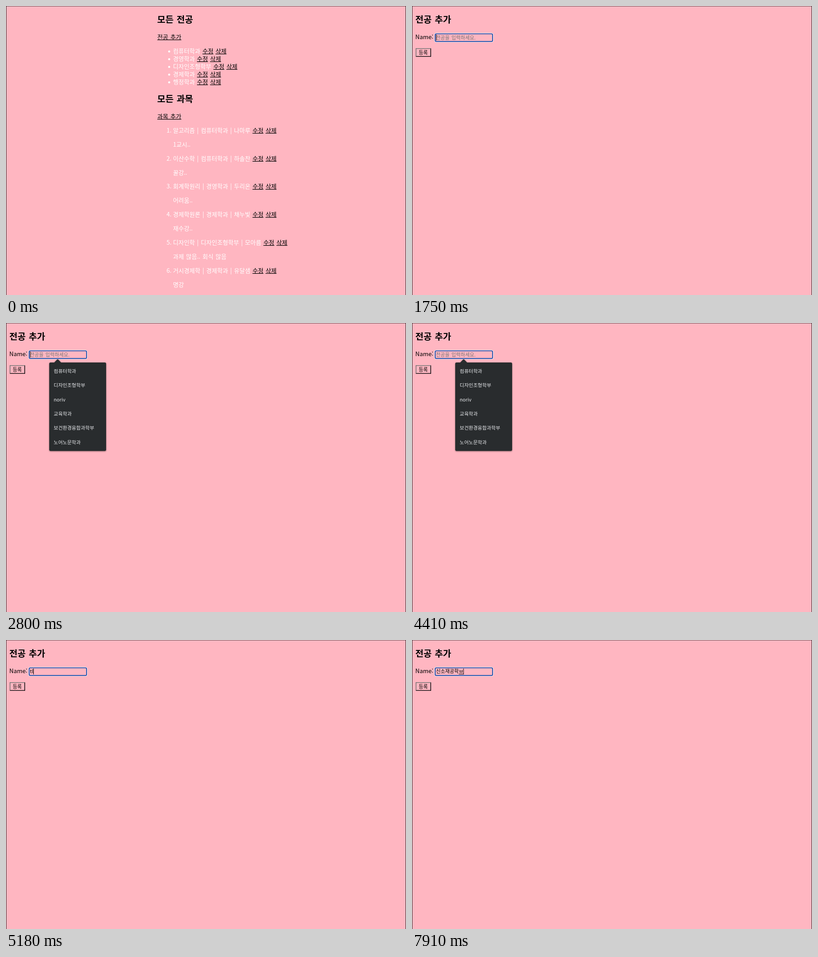
An HTML page that plays this animation: 879 px wide and 637 px high, repeating every 8 s.

```html
<!DOCTYPE html>
<html lang="ko">
<head>
<meta charset="utf-8">
<title>전공 추가</title>
<style>
  html, body { margin: 0; width: 100%; height: 100%; overflow: hidden; background: #ffb6c1; }
  svg { display: block; width: 100%; height: 100%; }
  text { font: 13.04px "Noto Sans CJK KR", "Noto Sans CJK", "Noto Sans", sans-serif; word-spacing: 1.1px; white-space: pre; }
  .title { font-size: 19.6px; font-weight: 700; }
  .item { fill: #fff; font-weight: 500; }
  .link { fill: #000; text-decoration: underline; }
  .small { font-size: 10.87px; }
  .hint { fill: #757575; }
  .option { font-size: 10.75px; fill: #e8eaed; }
  .composing { text-decoration: underline; }
  #popup { filter: drop-shadow(0 1px 1.5px #0007); }
</style>
</head>
<body>
<svg viewBox="0 0 879 637">
  <rect width="879" height="637" fill="#ffb6c1"/>
  <g id="listPage"></g>
  <g id="formPage">
    <text class="title" x="7.3" y="36.8">전공 추가</text>
    <text x="7.3" y="73">Name:</text>
    <g id="plainBorder"></g>
    <g id="focusRing" fill="none">
      <rect x="49.2" y="59.9" width="129.6" height="19.9" rx="4" stroke="#fff" stroke-opacity=".8"/>
      <rect x="50.9" y="61.4" width="126.2" height="16.9" rx="2.5" stroke="#1a52b0" stroke-width="1.9"/>
    </g>
    <text id="hint" class="small hint" x="52.6" y="73.5">전공을 입력하세요.</text>
    <text id="typed" class="small" x="52.8" y="73.4"><tspan id="done"></tspan><tspan id="composing"></tspan></text>
    <rect id="caret" y="63" width="1" height="13"/>
    <g id="button"><text class="small" x="14.8" y="106.5">등록</text></g>
    <g id="popup">
      <path d="M105 88 L112.3 80.6 Q113.5 79.4 114.7 80.6 L122 88Z" fill="#292c2e"/>
      <rect x="95" y="87" width="125" height="195" rx="3" fill="#292c2e"/>
    </g>
  </g>
  <path d="M0 .5H879" stroke="#6d5358"/>
  <path d="M.5 0V637M878.5 0V637" stroke="#30262a"/>
</svg>
<script>
const LOOP = 8000, FORM_AT = 910, FOCUS_AT = 1750, POPUP_AT = 1820, TYPE_AT = 4550;
const CARET_TOGGLES = [2240, 2800, 3290, 3850, 4410];

// [time, committed text, syllable still being composed]
const KEYS = [
  [TYPE_AT, "t"], [4690, "tl"], [4760, "tls"],
  [5180, "tl"], [5390, "t"], [5530, ""],
  [5810, "", "ㅅ"], [5880, "", "시"], [6160, "", "신"],
  [6440, "신", "ㅅ"], [6510, "신", "소"],
  [6720, "신소", "ㅈ"], [6790, "신소", "재"],
  [7070, "신소재", "ㄱ"], [7140, "신소재", "고"], [7280, "신소재", "공"],
  [7420, "신소재공", "ㅎ"], [7560, "신소재공", "하"], [7700, "신소재공", "학"],
  [7910, "신소재공학", "ㅂ"]
];
const MAJORS = ["컴퓨터학과", "경영학과", "디자인조형학부", "경제학과", "행정학과"];
const COURSES = [
  ["알고리즘 | 컴퓨터학과 | 나마루", "1교시.."],
  ["이산수학 | 컴퓨터학과 | 하솔찬", "꿀강.."],
  ["회계학원리 | 경영학과 | 두리온", "어려움.."],
  ["경제학원론 | 경제학과 | 채누빛", "재수강.."],
  ["디자인학 | 디자인조형학부 | 모아름", "과제 많음.. 회식 많음"],
  ["거시경제학 | 경제학과 | 유달샘", "명강"]
];
const OPTIONS = ["컴퓨터학과", "디자인조형학부", "noriv", "교육학과", "보건환경융합과학부", "노어노문학과"];

const el = id => document.getElementById(id);
const add = (parent, markup) => parent.insertAdjacentHTML("beforeend", markup);
const text = (cls, x, y, content, extra = "") =>
  `<text class="${cls}" x="${x}" y="${y}" ${extra}>${content}</text>`;
const link = label => `<tspan class="link">${label}</tspan>`;
const editable = label => `${label} ${link("수정")} ${link("삭제")}`;

function bevel(parent, x, y, w, h, topLeft, bottomRight, b = 1.6) {
  const r = x + w, d = y + h;
  add(parent, `<path fill="${topLeft}" d="M${x} ${d}V${y}H${r}l${-b} ${b}H${x + b}V${d - b}Z"/>
    <path fill="${bottomRight}" d="M${x} ${d}H${r}V${y}l${-b} ${b}V${d - b}H${x + b}Z"/>`);
}

function build() {
  const page = el("listPage");
  add(page, text("title", 332.3, 36.8, "모든 전공") + text("", 332.6, 72.9, link("전공 추가")));
  MAJORS.forEach((name, i) => {
    const y = 104 + 17 * i;
    add(page, `<circle cx="358.6" cy="${y - 3.8}" r="2.2" fill="#fff"/>` + text("item", 367, y, editable(name)));
  });
  add(page, text("title", 332.3, 211.5, "모든 과목") + text("", 332.6, 247.9, link("과목 추가")));
  COURSES.forEach(([name, note], i) => {
    const y = 278.8 + 61.8 * i;
    add(page, text("item", 363.6, y, `${i + 1}.`, 'text-anchor="end"') +
      text("item", 367, y, editable(name)) + text("item", 367, y + 30.9, note));
  });
  bevel(el("plainBorder"), 50.6, 61.2, 126.8, 17.3, "#222", "#767676");
  bevel(el("button"), 8, 93, 34, 19, "#767676", "#161214");
  OPTIONS.forEach((name, i) => add(el("popup"), text("option", 104.8, 110.1 + 31.3 * i, name)));
}

const show = (id, visible) => { el(id).style.display = visible ? "" : "none"; };

function render(t) {
  const focused = t >= FOCUS_AT;
  const [, done = "", composing = ""] = KEYS.filter(([at]) => t >= at).pop() || [];
  const empty = !done && !composing;
  const blinks = CARET_TOGGLES.filter(at => t >= at).length;

  show("listPage", t < FORM_AT);
  show("formPage", t >= FORM_AT);
  show("plainBorder", !focused);
  show("focusRing", focused);
  show("popup", t >= POPUP_AT && t < TYPE_AT);
  show("hint", empty);
  show("caret", focused && (t >= TYPE_AT || blinks % 2 === 0));

  el("done").textContent = done;
  el("composing").textContent = composing;
  el("composing").setAttribute("class", composing ? "composing" : "");
  const width = empty ? 0 : el("typed").getComputedTextLength();
  el("caret").setAttribute("x", 52.8 + width);
}

build();
const start = performance.now();
function tick() {
  render((performance.now() - start) % LOOP);
  requestAnimationFrame(tick);
}
tick();
</script>
</body>
</html>
```
